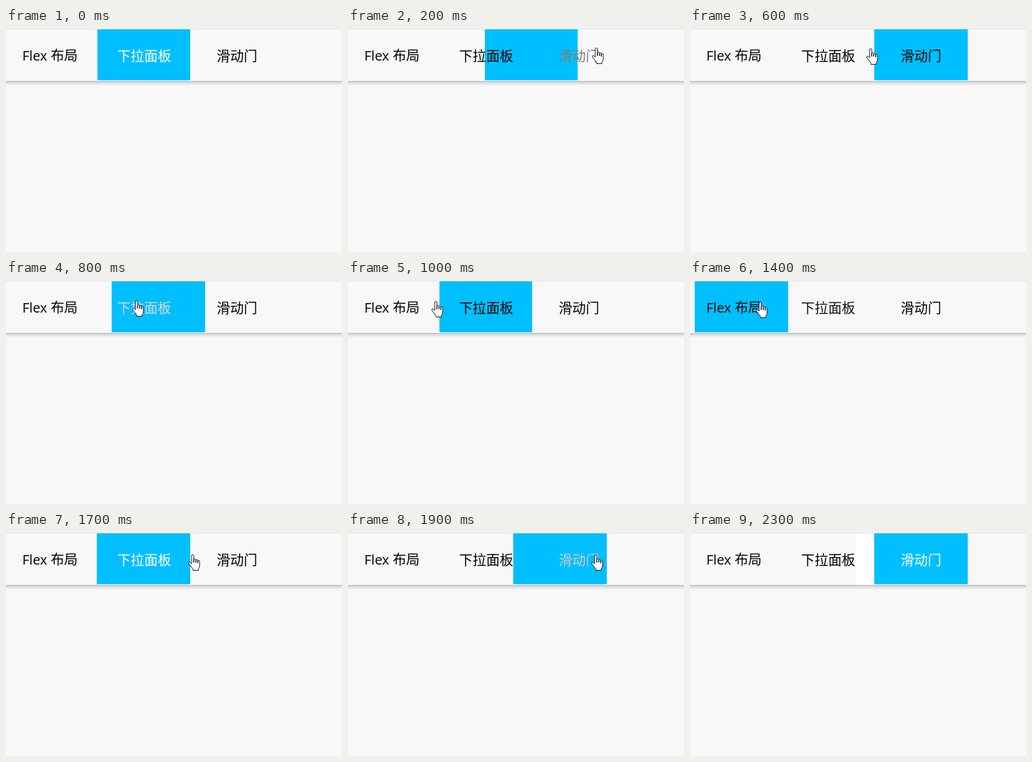
An HTML page for the animation above (2.8 s loop, 496 by 330 pixels).

```html
<!DOCTYPE html>
<html lang="zh-CN">
<head>
<meta charset="utf-8">
<style>
html, body { margin: 0; width: 100%; height: 100%; overflow: hidden; background: #f8f8f8; }
svg { display: block; }
text { font: 20px "Open Sans", "Noto Sans CJK SC", "Noto Sans CJK", sans-serif; }
</style>
</head>
<body>
<svg width="496" height="330" viewBox="0 0 496 330">
  <defs>
    <linearGradient id="shade" x2="0" y2="1">
      <stop stop-color="#b9b9bc"/>
      <stop offset=".3" stop-color="#d9d9dc"/>
      <stop offset="1" stop-color="#f8f8f8"/>
    </linearGradient>
  </defs>
  <rect y="1" width="496" height="1" fill="#dedede"/>
  <rect y="78" width="496" height="7" fill="url(#shade)"/>
  <rect id="gap" x="245" y="2" height="75" fill="#fff"/>
  <rect id="bar" y="2" height="75" fill="#00bfff"/>
  <text x="24" y="48">Flex 布局</text>
  <text x="164" y="49">下拉面板</text>
  <text x="311" y="49">滑动门</text>
  <path id="hand" fill="#fff" stroke="#1c1c2c" stroke-linejoin="round"
    d="M5 14V2a1.6 1.6 0 0 1 3.2 0V12V8a1.5 1.5 0 0 1 3 0V12V9a1.4 1.4 0 0 1 2.8 0V13V10a1.4 1.4 0 0 1 2.8 0V16Q17 19 15 21V23.5H7V21.5L1 14Q0 12 2 11.5Q3 11.4 5 14Z"/>
</svg>
<script>
const LOOP = 2800, STEP = 100, REST = 2300, GLIDE = 350, ITEM = 137.5;
const hoverTimes = [99, 610, 1010, 1370, 1726];
const ENTER = 100, TURN = 1300, BACK = 660; // pointer timing
const [gap, bar, hand] = ["gap", "bar", "hand"].map(id => document.getElementById(id));
const labels = document.querySelectorAll("text");

const slot = i => ITEM * i - 3;
// Hovers sweep 2, 1, 0, 1, 2; the loop opens resting on item 1.
const hovered = n => n < 0 ? 1 : Math.abs(2 - n);

// cubic-bezier(.25, .1, .25, 1)
function ease(p) {
  if (p <= 0) return 0;
  if (p >= 1) return 1;
  let lo = 0, hi = 1;
  for (let i = 0; i < 20; i++) {
    const s = (lo + hi) / 2;
    if (.75 * s * (1 - s) + s ** 3 < p) lo = s; else hi = s;
  }
  return .3 * lo * (1 - lo) ** 2 + 3 * lo * lo * (1 - lo) + lo ** 3;
}

// The pointer swings left slowly, then returns faster while drifting down.
function moveHand(t) {
  hand.style.display = t >= ENTER && t < REST ? "" : "none";
  const span = t < TURN ? TURN - ENTER : BACK;
  const x = Math.round(223 - 142 * Math.cos(Math.PI * (t - TURN) / span));
  const y = 29 + Math.floor(t / 425);
  hand.setAttribute("transform", `translate(${x} ${y})`);
}

function draw(t) {
  const n = hoverTimes.filter(h => h <= t + 20).length - 1;
  const item = hovered(n), from = slot(hovered(n - 1));
  const e = n < 0 ? 1 : ease((t - hoverTimes[n]) / GLIDE);
  const x = from + (slot(item) - from) * e;
  const left = Math.round(x);
  bar.setAttribute("x", left);
  bar.setAttribute("width", Math.round(x + ITEM) - left);
  gap.setAttribute("width", t >= 2000 ? left - 245 : 0);
  const c = Math.round(255 * e);
  labels.forEach((label, i) => label.setAttribute("fill", i === item ? `rgb(${c},${c},${c})` : "#000"));
  moveHand(t);
}

function tick() {
  const t = performance.now() % LOOP;
  draw(Math.min(REST, Math.floor(t / STEP) * STEP));
  requestAnimationFrame(tick);
}
tick();
</script>
</body>
</html>
```
